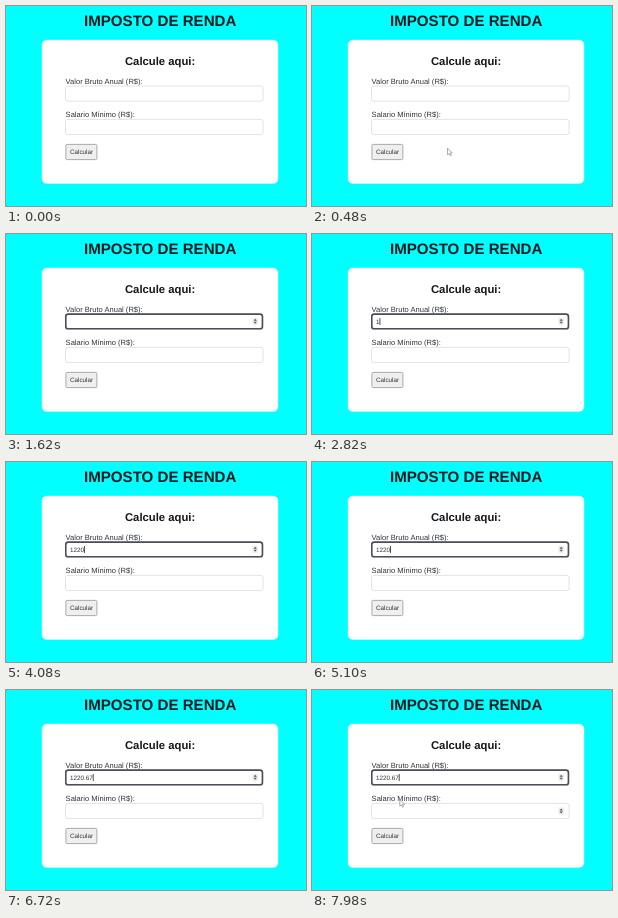
Recreate the animation shown at these times as an HTML page. Size 300 by 200 pixels, loop 8 s.

```html
<!DOCTYPE html>
<html lang="pt-BR">
<head>
<meta charset="utf-8">
<title>Imposto de Renda</title>
<style>
  html, body { margin: 0; width: 100%; height: 100%; overflow: hidden; background: #0ff; }
  svg { display: block; width: 100vw; height: 100vh; }
  text {
    font-family: "Liberation Sans", Arial, sans-serif; font-size: 7.55px;
    fill: #303438; white-space: pre; text-rendering: geometricPrecision;
  }
  .title { font-size: 15.1px; font-weight: bold; text-anchor: middle; fill: #0c1a20; }
  .subtitle { font-size: 11.3px; font-weight: bold; text-anchor: middle; fill: #14181c; }
  .control { font-size: 6.3px; fill: #333; }
  .field { fill: #fff; stroke: #dcdcdc; stroke-width: .8; }
</style>
</head>
<body>
<svg viewBox="0 0 300 200">
  <defs>
    <g id="spinner">
      <rect x="-2.8" y="-3.6" width="5.6" height="7.2" rx=".6" fill="#ededed"/>
      <path d="M-1.6-.5 0-2.5 1.6-.5zM-1.6.5 0 2.5 1.6.5z" fill="#555"/>
    </g>
  </defs>
  <rect width="300" height="200" fill="#0ff"/>
  <text class="title" x="154.2" y="19.9">IMPOSTO DE RENDA</text>
  <rect x="36" y="34" width="236" height="143.6" rx="5" fill="#fff" stroke="#fff" stroke-opacity=".35"/>
  <text class="subtitle" x="154.1" y="58.8">Calcule aqui:</text>

  <text x="59.6" y="77.8">Valor Bruto Anual (R$):</text>
  <rect class="field" x="59.5" y="80" width="197.6" height="15.2" rx="2.4"/>
  <rect id="focus" x="59.8" y="80.1" width="196.6" height="14.7" rx="2.4" fill="none" stroke="#4c4f5a" stroke-width="1.6"/>
  <text id="value" class="control" x="64" y="89.5"></text>
  <rect id="caret" y="84" width=".8" height="7" fill="#222"/>
  <use id="spin1" href="#spinner" x="249.2" y="87.3"/>

  <text x="59.6" y="111.2">Salario Mínimo (R$):</text>
  <rect class="field" x="59.5" y="113.4" width="197.6" height="15.2" rx="2.4"/>
  <use id="spin2" href="#spinner" x="249.2" y="121"/>

  <rect x="59.9" y="138.4" width="31" height="15.2" rx="1.2" fill="#efefef" stroke="#a2a2a2" stroke-width=".9"/>
  <text class="control" x="64" y="148.3">Calcular</text>

  <path id="pointer" d="M0 0V6.8L1.6 5.4 2.7 7.8 3.8 7.3 2.7 5H4.8z" fill="#fff" stroke="#777" stroke-width=".6"/>
</svg>
<script>
  const LOOP = 8000;
  const el = id => document.getElementById(id);
  const show = (id, on) => el(id).setAttribute('visibility', on ? 'visible' : 'hidden');

  const typed = [[0, ''], [2820, '1'], [2940, '12'], [3240, '122'], [4080, '1220'],
                 [5700, '1220.'], [6300, '1220.6'], [6720, '1220.67']];
  const caretOn = [[0, false], [1140, true], [1620, false], [2160, true], [3780, false],
                   [4080, true], [4620, false], [5100, true], [5640, false], [5700, true],
                   [6180, false], [6300, true], [7200, false], [7740, true]];
  const at = (steps, t) => steps.filter(s => s[0] <= t).pop()[1];

  // Pointer moves: start, end, from x/y, to x/y
  const moves = [[60, 840, 140, 200, 132, 96], [7560, 7860, 96, 92, 87.8, 109.4]];
  const ease = p => p * p * (3 - 2 * p);

  function placePointer(t) {
    const move = moves.find(([start, end], i) => t >= start && (t < end || i === 1));
    show('pointer', move);
    if (!move) return;
    const [start, end, x0, y0, x1, y1] = move;
    const p = ease(Math.min(1, (Math.floor(t / 60) * 60 - start) / (end - start)));
    el('pointer').setAttribute('transform', `translate(${x0 + (x1 - x0) * p} ${y0 + (y1 - y0) * p})`);
  }

  function render(t) {
    const value = el('value');
    value.textContent = at(typed, t);
    const width = value.textContent ? value.getComputedTextLength() : 0;
    el('caret').setAttribute('x', 64 + width);
    show('caret', at(caretOn, t));
    show('focus', t >= 1140);
    show('spin1', t >= 840);
    show('spin2', t >= 7980);
    placePointer(t);
  }

  const began = performance.now();
  function frame() {
    render((performance.now() - began) % LOOP);
    requestAnimationFrame(frame);
  }
  frame();
</script>
</body>
</html>
```
